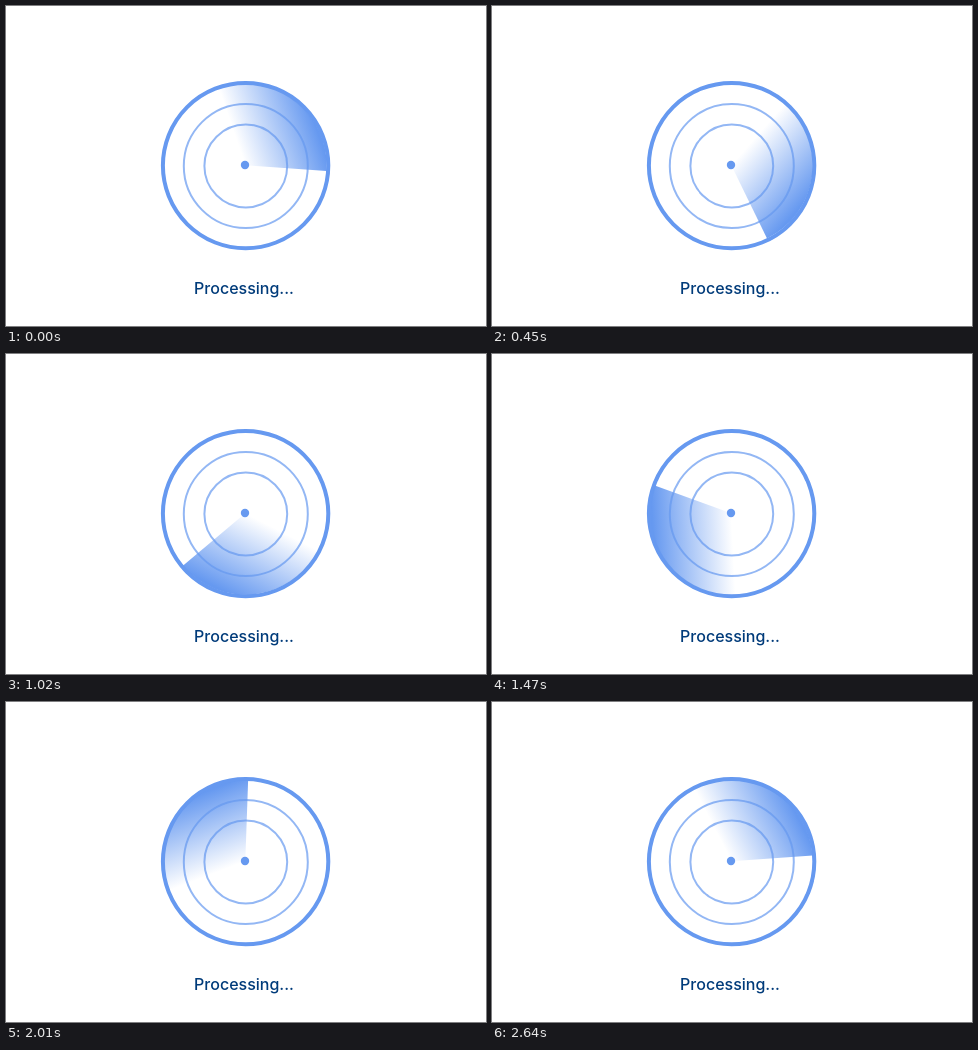
An HTML page that plays this animation: 480x320 px, repeating every 2.67 s.

```html
<!DOCTYPE html>
<html lang="en">
<head>
<meta charset="utf-8">
<title>Processing</title>
<style>
  html, body { margin: 0; width: 100%; height: 100%; overflow: hidden; background: #fff; }
  svg { display: block; }
  text { font: 500 16px Inter, sans-serif; fill: #003b7a; }
</style>
</head>
<body>
<svg width="480" height="320" viewBox="0 0 480 320">
  <defs>
    <!-- Runs at right angles to the trailing edge of the beam -->
    <linearGradient id="fade" gradientUnits="userSpaceOnUse" x1="0" y1="0" x2="79" y2="0" gradientTransform="rotate(-23)">
      <stop offset="0" stop-color="#6699f0" stop-opacity="0"/>
      <stop offset="1" stop-color="#6699f0"/>
    </linearGradient>
  </defs>
  <path id="beam" fill="url(#fade)"/>
  <g fill="none" stroke="#6699f0">
    <g stroke-width="2" stroke-opacity=".7">
      <circle cx="239.8" cy="160" r="41.4"/>
      <circle cx="239.8" cy="160" r="62"/>
    </g>
    <circle cx="239.6" cy="159.6" r="82.7" stroke-width="4"/>
  </g>
  <circle cx="239" cy="159" r="4.2" fill="#6699f0"/>
  <text x="238" y="288" text-anchor="middle">Processing...</text>
</svg>
<script>
  const LOOP = 2670, STEP = 30, DEGREES = 4, RADIUS = 81.5, SPREAD = 113 * Math.PI / 180;
  const beam = document.getElementById('beam');
  const tail = [RADIUS * Math.cos(SPREAD), -RADIUS * Math.sin(SPREAD)];
  beam.setAttribute('d', `M0 0L${tail}A${RADIUS} ${RADIUS} 0 0 1 ${RADIUS} 0Z`);

  function draw() {
    const step = Math.floor(performance.now() % LOOP / STEP);
    beam.setAttribute('transform', `translate(239.3 159.3) rotate(${DEGREES * (step + 1)})`);
    requestAnimationFrame(draw);
  }
  draw();
</script>
</body>
</html>
```
